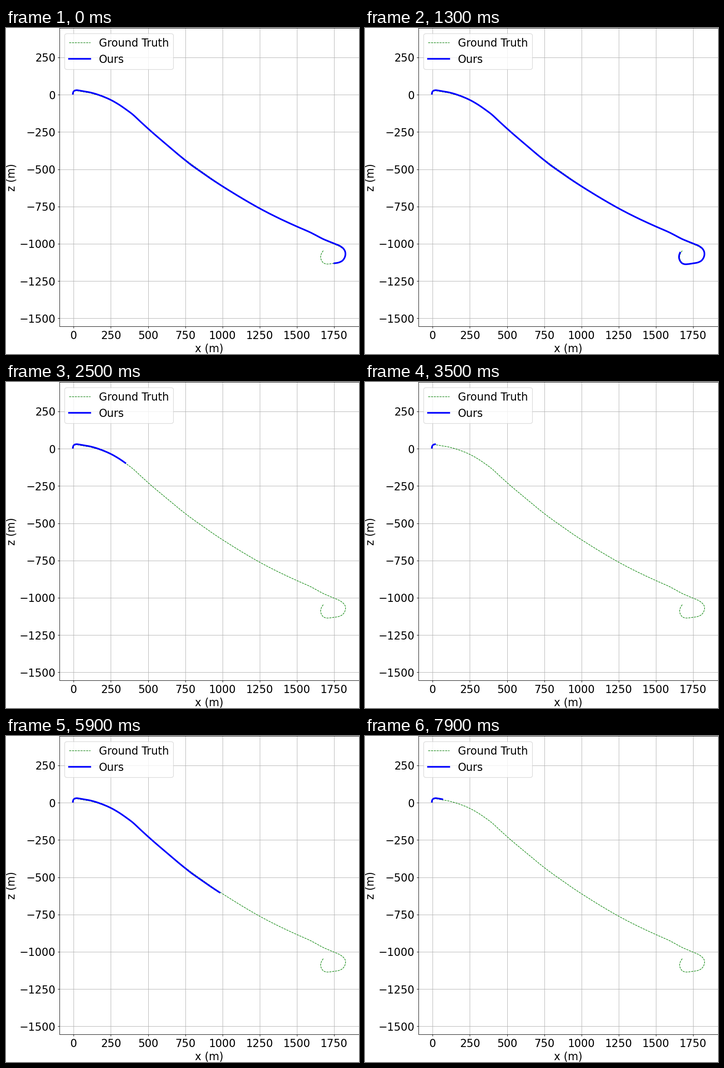
Write a matplotlib script that moves like this. It is 779 by 719 pixels and loops after 8 s.

```python
import numpy as np
import matplotlib.pyplot as plt
from matplotlib.animation import FuncAnimation

W, H, DPI = 779, 719, 85
LEFT, TOP, RIGHT, BOTTOM = 117.5, 0.5, 779.5, 658.5   # axes box, pixels
X0, Y0 = 149.4, 147.1                                 # pixel of x = 0, z = 0
SX, SY = 82.06 / 250, 82.22 / 250                     # pixels per metre

# Way points of the estimated route, in stage pixels
ROUTE = np.array([
    (147.5, 145), (148.5, 141), (151, 138.3), (155, 137.2), (162, 137.9),
    (171, 139.5), (183, 141.5), (195, 144.5), (210, 149.5), (231, 158.5),
    (247, 167.5), (264, 179), (280, 191), (295, 205), (320, 227.7),
    (350, 253.5), (391, 288), (410, 303), (430, 317), (450, 331),
    (472, 345.5), (500, 363), (530, 381), (560, 398), (600, 418.5),
    (640, 437), (672, 451), (700, 465.5), (722, 474.5), (739, 482),
    (745, 487), (748.6, 494), (749, 500), (747, 507), (742, 513.5),
    (735, 517), (724, 519), (712, 520.8), (706, 521), (700, 519),
    (695.5, 514), (693, 507), (693.3, 501), (695.5, 495), (697.5, 491.5)])

# Sample number at which some way points are reached
SAMPLES = [0, 30, 70, 110, 200, 300, 390, 510, 895, 990, 1090, 1100]
REACHED = [0, 3, 5, 7, 11, 14, 16, 20, 29, 36, 43, 44]

# Offset of the true route: way point, dx, dy
DRIFT = np.array([
    (0, 0, -1), (3, 0, 1.5), (7, 0, 1.5), (11, 0, .5), (14, 0, 0),
    (17, 1, -1.3), (20, .5, -1), (23, 0, -.4), (26, 0, .3), (28, 0, 1.5),
    (30, .3, 2), (32, .3, 0), (36, 0, 0), (38, .8, -.6), (41, 1.4, -.5),
    (43, 2, 0), (44, 3, -1)])


def spline(pts, n=40):
    """Hermite curve through pts; returns way point parameter and curve."""
    chord = np.r_[0, np.cumsum(np.hypot(*np.diff(pts, axis=0).T))]
    tan = np.gradient(pts, chord, axis=0)
    u = np.linspace(0, len(pts) - 1, (len(pts) - 1) * n + 1)
    i = np.minimum(u.astype(int), len(pts) - 2)
    t = (u - i)[:, None]
    h = np.diff(chord)[i][:, None]
    curve = ((1 + 2 * t) * (1 - t) ** 2 * pts[i] + t * (1 - t) ** 2 * h * tan[i]
             + t * t * (3 - 2 * t) * pts[i + 1] + t * t * (t - 1) * h * tan[i + 1])
    return u, curve


def metres(p):
    return (p[:, 0] - X0) / SX, (Y0 - p[:, 1]) / SY


u, curve = spline(ROUTE)
dist = np.r_[0, np.cumsum(np.hypot(*np.diff(curve, axis=0).T))]
drift = np.column_stack([np.interp(u, DRIFT[:, 0], DRIFT[:, c]) for c in (1, 2)])

# One route point per sample
along = np.interp(np.arange(1101), SAMPLES, np.interp(REACHED, u, dist))
ours = np.column_stack([np.interp(along, dist, curve[:, c]) for c in (0, 1)])
ours_x, ours_z = metres(ours)

plt.rcParams.update({"font.family": "DejaVu Sans", "font.size": 20})
fig = plt.figure(figsize=((W + 1e-3) / DPI, (H + 1e-3) / DPI), dpi=DPI,
                 facecolor="white")
ax = fig.add_axes([LEFT / W, 1 - BOTTOM / H, (RIGHT - LEFT) / W, (BOTTOM - TOP) / H])
ax.set_xlim((LEFT - X0) / SX, (RIGHT - X0) / SX)
ax.set_ylim((Y0 - BOTTOM) / SY, (Y0 - TOP) / SY)
ax.set_xticks(range(0, 1751, 250))
ax.set_yticks(range(-1500, 251, 250))
ax.set_xlabel("x (m)")
ax.set_ylabel("z (m)")
ax.spines["right"].set_visible(False)
ax.grid(True)

ax.plot(*metres(curve + drift), "--", color="green", lw=1, label="Ground Truth")
line, = ax.plot([], [], color="blue", lw=3, label="Ours")
ax.legend(loc="upper left")

# Steps play in alphabetical order of their numbers: 0, 10, 100, 1000, ...
ORDER = sorted(range(0, 1101, 10), key=str)


def update(n):
    count = ORDER[n - 1]
    line.set_data(ours_x[:count], ours_z[:count])
    return line,


anim = FuncAnimation(fig, update, frames=80, interval=100, repeat=True,
                     repeat_delay=0, blit=False)
plt.show()
```
